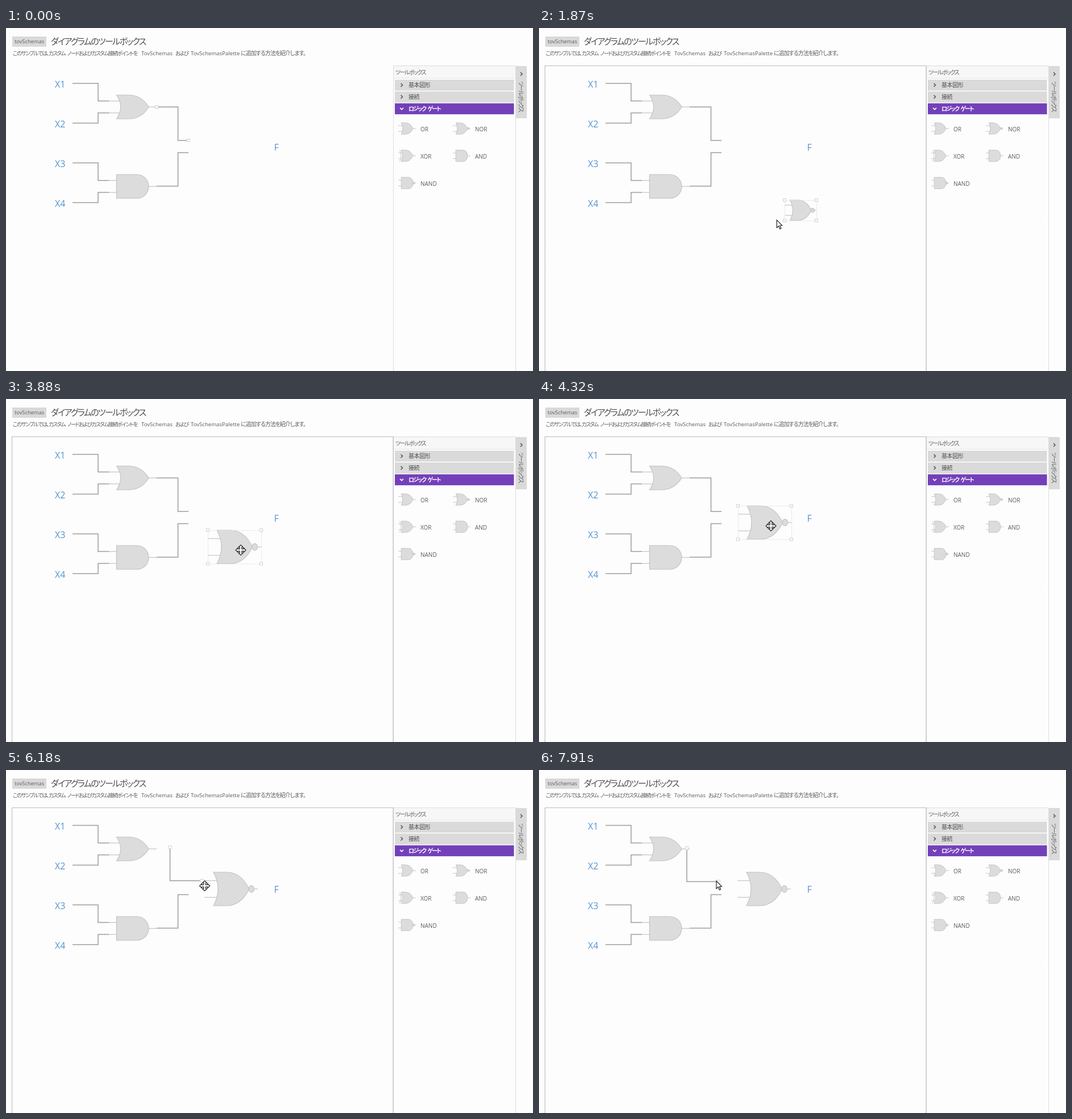
These frames come from a looping animation (927 px wide and 604 px high, 8000 ms). An HTML page with a canvas:

```html
<!DOCTYPE html>
<html lang="ja">
<head>
<meta charset="utf-8">
<title>ツールボックス</title>
<style>
  html, body { margin: 0; width: 100%; height: 100%; overflow: hidden; background: #fdfdfd; }
  canvas, svg { position: absolute; left: 0; top: 0; width: 927px; height: 604px; }
  text { font: 10px "Open Sans", "Noto Sans CJK JP", "Noto Sans CJK", sans-serif; fill: #5c5c5c; }
  .jp { font-family: "Noto Sans CJK JP", "Noto Sans CJK", sans-serif; font-feature-settings: "palt"; letter-spacing: -.15em; word-spacing: .3em; }
  .title { font-size: 15px; letter-spacing: -.113em; fill: #4c4c4c; }
  .small { font-size: 9.6px; }
  .kanji { letter-spacing: -.1em; }
  .head { font-weight: 500; letter-spacing: -.04em; fill: #505050; }
  .open { font-weight: 700; letter-spacing: -.18em; fill: #fff; }
  .pin { font-size: 16px; fill: #5495d4; }
</style>
</head>
<body>
<canvas id="base" width="927" height="604"></canvas>
<svg id="labels" viewBox="0 0 927 604">
  <text x="15" y="27" style="font-size:9.3px">tovSchemas</text>
  <text class="jp title" x="79" y="29">ダイアグラムのツールボックス</text>
  <text class="jp small" x="12" y="48">このサンプルでは、カスタム ノードおよびカスタム接続ポイントを</text>
  <text class="small" x="238" y="48">TovSchemas</text>
  <text class="jp small" x="298" y="48">および</text>
  <text class="small" x="325" y="48">TovSchemasPalette</text>
  <text class="jp kanji" x="413" y="48">に追加する方法を紹介します。</text>
  <text class="jp" x="685" y="81.5">ツールボックス</text>
  <text class="jp" transform="translate(902 94) rotate(90)">ツールボックス</text>
  <text class="pin" x="471.5" y="215.5">F</text>
</svg>
<canvas id="top" width="927" height="604"></canvas>
<script>
const LOOP = 8000, STEP = 143.8, GLIDE = 800;
const WIRE = '#9c9c9c', FILL = '#dcdcdc', EDGE = '#c4c4c4';
const base = document.getElementById('base').getContext('2d');
const stage = document.getElementById('top').getContext('2d');
const labels = document.getElementById('labels');

function label(text, x, y, cls = '') {
  const el = document.createElementNS('http://www.w3.org/2000/svg', 'text');
  el.setAttribute('x', x);
  el.setAttribute('y', y);
  el.setAttribute('class', cls);
  el.textContent = text;
  labels.append(el);
}

function rect(c, x, y, w, h, color) {
  c.fillStyle = color;
  c.fillRect(x, y, w, h);
}

function line(c, pts, color, width) {
  c.beginPath();
  pts.forEach(p => c.lineTo(...p));
  c.strokeStyle = color;
  c.lineWidth = width;
  c.stroke();
}

function paint(c, fill, edge, width) {
  c.fillStyle = fill;
  c.strokeStyle = edge;
  c.lineWidth = width;
  c.fill();
  c.stroke();
}

// Draws a logic gate filling the box x, y, w, h.
function gate(c, kind, x, y, w, h, width = 1.2) {
  const round = kind.endsWith('AND');
  const back = .17, tip = .835, shoulder = round ? .59 : .41;
  c.save();
  c.translate(x, y);
  for (const v of [.25, .75])
    line(c, [[0, v * h], [(round ? back : .24) * w, v * h]], EDGE, width);
  line(c, [[tip * w, h / 2], [w, h / 2]], EDGE, width);

  c.beginPath();
  c.moveTo(back * w, 0);
  c.lineTo(shoulder * w, 0);
  if (round) {
    c.ellipse(shoulder * w, h / 2, (tip - shoulder) * w, h / 2, 0, -Math.PI / 2, Math.PI / 2);
  } else {
    c.quadraticCurveTo(.69 * w, 0, tip * w, h / 2);
    c.quadraticCurveTo(.69 * w, h, shoulder * w, h);
  }
  c.lineTo(back * w, h);
  c.quadraticCurveTo((round ? back : .34) * w, h / 2, back * w, 0);
  c.closePath();
  paint(c, FILL, EDGE, width);

  if (kind === 'XOR') {
    c.beginPath();
    c.moveTo(.08 * w, 0);
    c.quadraticCurveTo(.25 * w, h / 2, .08 * w, h);
    c.stroke();
  }
  if (kind[0] === 'N') {
    c.beginPath();
    c.ellipse(.88 * w, h / 2, .05 * w, .1 * h, 0, 0, 7);
    paint(c, FILL, EDGE, width);
  }
  c.restore();
}

function chevron(x, y, angle, color) {
  base.save();
  base.translate(x, y);
  base.rotate(angle);
  line(base, [[-1.5, -3], [1.5, 0], [-1.5, 3]], color, 1.5);
  base.restore();
}

function drawToolbox() {
  rect(base, 682, 67, 214, 22, '#f7f7f7');
  line(base, [[681.5, 604], [681.5, 66.5], [896.5, 66.5], [896.5, 604]], '#dedede', 1);
  line(base, [[682, 88.5], [896, 88.5]], '#e6e6e6', 1);
  rect(base, 897, 67, 19, 92, '#dadada');
  chevron(906.5, 81, 0, '#555');
  ['基本図形', '接続', 'ロジック ゲート'].forEach((name, i) => {
    const open = i === 2, y = 91 + 20.8 * i;
    rect(base, 684, y, 209.5, 19.3, open ? '#7340b9' : '#dadada');
    chevron(696, y + 9.5, open ? Math.PI / 2 : 0, open ? '#fff' : '#555');
    label(name, 708, y + 13.2, open ? 'jp open' : 'jp head');
  });
  ['OR', 'NOR', 'XOR', 'AND', 'NAND'].forEach((kind, i) => {
    const x = 690 + 96 * (i % 2), y = 167 + 48 * Math.floor(i / 2);
    gate(base, kind, x, y, 31, 20, 1);
    label(kind, x + 39, y + 14.5);
  });
}

function drawCircuit() {
  ['OR', 'AND'].forEach((kind, i) => gate(base, kind, 180, 118 + 140 * i, 85, 42));
  for (let i = 0; i < 4; i++) {
    const y = 97.5 + 70 * i, port = 128.5 + 140 * (i >> 1) + 21 * (i % 2);
    line(base, [[117, y], [162, y], [162, port], [181, port]], WIRE, 1.5);
    label('X' + (i + 1), 86, y + 7, 'pin');
  }
  line(base, [[265, 278.5], [302.5, 278.5], [302.5, 219.5], [321, 219.5]], WIRE, 1.5);
}

// Rests at each stop [time, x, y], then glides to reach the next one on time.
function follow(stops, t) {
  const i = stops.findIndex(s => s[0] > t);
  if (i < 1) return stops.at(i).slice(1);
  const [t0, x0, y0] = stops[i - 1], [t1, x1, y1] = stops[i];
  const u = Math.max(0, 1 - (t1 - t) / Math.min(GLIDE, t1 - t0));
  const s = u * u * (3 - 2 * u);
  return [x0 + (x1 - x0) * s, y0 + (y1 - y0) * s];
}

const ENTER = 580, PICK = 1010, DROP = 1810, CORNER = 2600, SIZED = 3160,
  GRAB = 3500, PLACED = 4460, SELECT = 5470, RELEASE = 7340;

const pointerStops = [
  [440, 885, 235], [PICK, 802, 187], [DROP, 417, 338],
  [CORNER, 494, 347], [SIZED, 532, 370], [GRAB, 490, 338],
  [3880, 413, 266], [PLACED, 407, 215], [5030, 341, 199],
  [SELECT, 325, 207], [6180, 349.5, 204], [RELEASE, 312, 195.5]
];
const wireStops = [[SELECT, 0, 0], [6180, 23.5, -3], [RELEASE, -5, -1.5]];
const pointer = t => follow(pointerStops, t);

function handle(c, x, y) {
  rect(c, x - 3, y - 3, 6, 6, '#fff');
  c.strokeStyle = '#d2d2d2';
  c.lineWidth = 1;
  c.strokeRect(x - 2.5, y - 2.5, 5, 5);
}

// A cursor of equal arrows around its centre.
function arrows(c, count, turn) {
  const arm = [[-1.8, -1.8], [-1.8, -5], [-4, -5], [0, -9], [4, -5], [1.8, -5]];
  c.beginPath();
  for (let i = 0; i < count; i++) {
    const a = turn + i * 2 * Math.PI / count;
    for (const [x, y] of arm)
      c.lineTo(x * Math.cos(a) - y * Math.sin(a), x * Math.sin(a) + y * Math.cos(a));
  }
}

function drawPointer(c, t) {
  const resizing = t >= CORNER - 150 && t < SIZED + 100;
  const moving = t >= SIZED && t < 4900 || t >= SELECT - 150 && t < RELEASE;
  c.save();
  c.translate(...pointer(t));
  if (resizing) arrows(c, 2, -Math.PI / 4);
  else if (moving) arrows(c, 4, 0);
  else {
    c.beginPath();
    for (const p of [[0, 0], [0, 13.5], [3.2, 10.6], [5.4, 15.8], [7.6, 14.8], [5.4, 9.8], [9.4, 9.6]])
      c.lineTo(...p);
  }
  c.closePath();
  paint(c, '#fff', '#222', 1.2);
  c.restore();
}

function drawWire(c, t) {
  const [dx, dy] = follow(wireStops, t);
  const a = [265 + dx, 139 + dy], b = [321 + dx, 198 + dy];
  const bend = dx ? [[a[0], b[1]]] : [[302.5, a[1]], [302.5, b[1]]];
  line(c, [a, ...bend, b], WIRE, 1.5);
  if (t < DROP || t >= SELECT) {
    handle(c, ...a);
    handle(c, ...b);
  }
}

function drawNode(c, t) {
  const [px, py] = pointer(Math.min(Math.max(t, GRAB), PLACED));
  const [cx, cy] = pointer(Math.min(Math.max(t, CORNER), SIZED));
  const x = Math.round(px - 58), y = Math.round(py - 35);
  const w = Math.round(cx - 438), h = Math.round(cy - 311);
  gate(c, 'NOR', x, y, w, h);
  if (t >= SELECT) return;
  c.strokeStyle = '#e6dfe4';
  c.lineWidth = 1;
  c.setLineDash([2, 1]);
  c.strokeRect(x + .5, y + .5, w, h);
  c.setLineDash([]);
  for (const hx of [x, x + w]) for (const hy of [y, y + h]) handle(c, hx, hy);
}

function drawGhost(c, t) {
  const [x, y] = pointer(t);
  c.globalAlpha = .8;
  gate(c, 'NOR', x + 27, y - 27, 31, 20, 1);
  c.globalAlpha = 1;
}

function drawFocus(c) {
  c.setLineDash([1, 1]);
  line(c, [[10.5, 604], [10.5, 66.5], [681, 66.5], [681, 604]], '#777', 1);
  c.setLineDash([]);
}

function draw(t) {
  stage.clearRect(0, 0, 927, 604);
  if (t >= PICK) drawFocus(stage);
  drawWire(stage, t);
  if (t >= DROP) drawNode(stage, t);
  else if (t > PICK) drawGhost(stage, t);
  if (t >= ENTER) drawPointer(stage, t);
}

function tick(now) {
  const n = Math.floor((now % LOOP + 6) / STEP);
  draw(Math.round(n * STEP / 10) * 10);
  requestAnimationFrame(tick);
}

rect(base, 0, 0, 927, 604, '#fdfdfd');
rect(base, 11, 15, 60, 18, '#d9d9d9');
drawToolbox();
drawCircuit();
draw(0);
requestAnimationFrame(tick);
</script>
</body>
</html>
```
